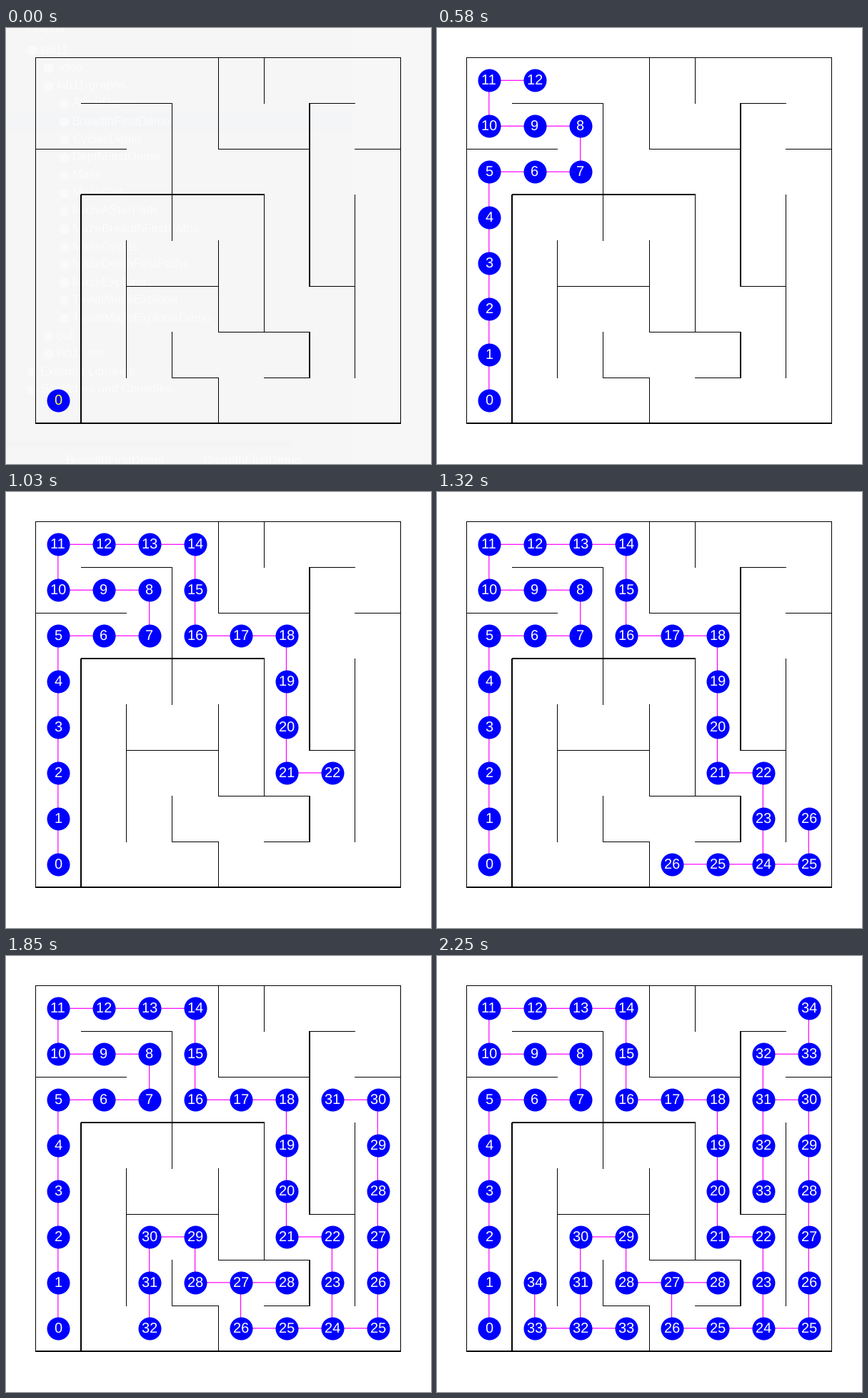
A matplotlib script for the animation above (5810 ms loop, 595x610 px).

```python
from itertools import product

import numpy as np
import matplotlib.pyplot as plt
from matplotlib.animation import FuncAnimation
from matplotlib.collections import LineCollection, PathCollection
from matplotlib.patches import Rectangle
from matplotlib.textpath import TextPath
from matplotlib.transforms import Affine2D

W, H, DPI = 595, 610, 100
PX = 72 / DPI
LOOP, TICK = 5810, 10
SPLASH_END = 30
PITCH, RADIUS = 63.93, 16
FONT = "Liberation Sans"

# "=" and "H" are heavy walls
MAZE = """\
+-+-+-+-+-+-+-+-+
|       | |     |
+ +-+-+ + + +-+ +
|     | |   H   |
+-+-+ + +-+-+ +-+
|     |     H   |
+ +=+=+=+=+ + + +
| H   |   | H | |
+ + + + + + + + +
| H |   | | H | |
+ + +-+-+ + +-+ +
| H |   | |   | |
+ + + + +-+-+ + +
| H | |     H | |
+ + + +-+ +-+ + +
| H     |       |
+=+=+=+=+=+=+=+=+""".splitlines()
SIZE = len(MAZE) // 2
START, GOAL = (0, SIZE - 1), (SIZE - 1, 0)

FILES = """\
lab11
 .idea
 lab11-graphs
  AStarDemo
  BreadthFirstDemo
  CyclesDemo
  DepthFirstDemo
  Maze
  MazeCell
  MazeAStarPath
  MazeBreadthFirstPaths
  MazeCycles
  MazeDepthFirstPaths
  MazeExplorer
  TrivialMazeExplorer
  TrivialMazeExplorerDemo
 out
 lab11.iml
External Libraries
Scratches and Consoles""".splitlines()

fig = plt.figure(figsize=(W / DPI, H / DPI), dpi=DPI, facecolor="white")
ax = fig.add_axes([0, 0, 1, 1])
ax.set_xlim(0, W)
ax.set_ylim(H, 0)
ax.axis("off")


def explore():
    """Breadth-first search: visited cells, their depths and parents."""
    cells, depths, parents = [START], [0], [None]
    for here, (c, r) in enumerate(cells):
        for dc, dr in ((-1, 0), (1, 0), (0, -1), (0, 1)):
            cell = (c + dc, r + dr)
            if MAZE[2 * r + 1 + dr][2 * c + 1 + dc] != " " or cell in cells:
                continue
            cells.append(cell)
            depths.append(depths[here] + 1)
            parents.append(here)
            if cell == GOAL:
                return np.array(cells), depths, parents


def grid_x(k):
    # pixel columns are rounded outwards from the middle line
    j = k - SIZE // 2
    return 297 + round(63.8 * j) - (j < 0)


def grid_y(k):
    return int(41.5 + PITCH * k)


def draw_walls():
    lines, widths = [], []
    for r, c in product(range(len(MAZE)), repeat=2):
        mark = MAZE[r][c]
        if mark in "+ ":
            continue
        heavy = mark in "=H"
        x, y = grid_x(c // 2), grid_y(r // 2)
        if mark in "-=":
            y += (r == 2 * SIZE) if heavy else 0.5
            lines.append([(x, y), (grid_x(c // 2 + 1) + 1, y)])
        else:
            x += 0 if heavy else 0.5
            lines.append([(x, y), (x, grid_y(r // 2 + 1) + 1)])
        widths.append((2 if heavy else 1) * PX)
    ax.add_collection(LineCollection(lines, colors="black", linewidths=widths,
                                     capstyle="butt", snap=False, zorder=2),
                      autolim=False)


def draw_splash():
    """Faint project window shining through while the maze opens."""
    def box(x, y, w, h, color):
        return ax.add_patch(Rectangle((x, y), w, h, fc=color, lw=0, zorder=0))

    def ghost(x, y, s):
        return ax.text(x, y, s, family=FONT, size=17 * PX, color="#fcfcfc",
                       va="center", zorder=1)

    parts = [box(0, 0, W, H, "#f6f6f6"), box(484, 0, W - 484, H, "#f7f7f7"),
             box(0, 119, 484, 25, "#f3f5f7"), box(0, 578, 400, 9, "#f4f4f4"),
             ghost(30, 1, "Project"), ghost(84, 605, "BreadthFirstDemo"),
             ghost(276, 605, "BreadthFirstDemo")]
    icons = []
    for i, line in enumerate(FILES):
        name = line.strip()
        x, y = 48 + 22.5 * (len(line) - len(name)), 31 + 25 * i
        parts.append(ghost(x, y, name))
        icons.append((x - 12, y))
    parts.append(ax.scatter(*zip(*icons), s=(14 * PX) ** 2, c="#fafafa",
                            lw=0, zorder=1))
    return parts


def label(x, y, text):
    path = TextPath((0, 0), text, size=20, prop={"family": FONT})
    left, base = np.rint((x - 5.5 * len(text), y + 6))
    return path.transformed(Affine2D().scale(1, -1).translate(left, base))


cells, depths, parents = explore()
spots = (73, 73.3) + PITCH * cells
links = [[spots[p] - (0.2, 0), spot - (0.2, 0)]
         for p, spot in zip(parents[1:], spots[1:])]
labels = [label(x, y, str(d)) for (x, y), d in zip(spots, depths)]

# The pace changes slightly at a few cells
reached = np.interp(range(len(spots)), [0, 1, 12, 40, 48], [0, 30, 580, 1850, 2250])
reached = np.rint(reached / TICK) * TICK

splash = draw_splash()
draw_walls()
edges = LineCollection(links, colors="#ff00ff", linewidths=1.2 * PX, snap=False,
                       zorder=3)
ax.add_collection(edges, autolim=False)
discs = ax.scatter(*spots.T, s=(2 * RADIUS * PX) ** 2, c="#0000ff", lw=0,
                   antialiased=False, zorder=4)
digits = PathCollection(labels, linewidths=0, zorder=5)
ax.add_collection(digits, autolim=False)


def update(i):
    now = i * TICK
    opening = now < SPLASH_END
    count = int(np.sum(reached <= now))
    for part in splash:
        part.set_visible(opening)
    edges.set_segments(links[:count - 1])
    discs.set_offsets(spots[:count])
    digits.set_paths(labels[:count])
    digits.set_facecolor("#ffff40" if opening else "white")
    return [*splash, edges, discs, digits]


anim = FuncAnimation(fig, update, frames=LOOP // TICK, interval=TICK,
                     init_func=lambda: update(0), repeat=True, repeat_delay=0)
plt.show()
```
